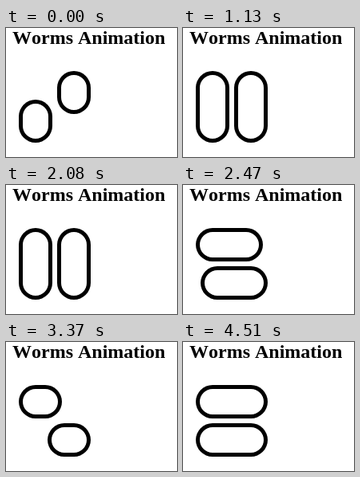
An HTML page for the animation above (4.61 s loop, 214 by 162 pixels).

```html
<!DOCTYPE html>
<html lang="en">
<head>
<meta charset="utf-8">
<title>Worms Animation</title>
<style>
  html, body { margin: 0; width: 100%; height: 100%; overflow: hidden; background: #fff; }
  svg { position: absolute; left: 0; top: 0; }
  text { font: bold 24px "Liberation Serif", "Times New Roman", serif; font-kerning: none; }
  #track { position: absolute; left: 16px; top: 54px; width: 90px; height: 90px; }
  .worm { position: absolute; border-radius: 50px; box-shadow: 0 0 0 5px #000 inset; }
</style>
</head>
<body>
<svg width="214" height="162"><text x="8" y="20">Worms Animation</text></svg>
<div id="track"><div class="worm"></div><div class="worm"></div></div>
<script>
const LOOP = 4610, STEP = 96, LEAD = 34; // ms; the first step is shorter by LEAD
const LAST = 47;                         // final step of the loop
const POSES = 8, GAP = 48;               // poses per lap, inset of a pulled-in edge
const START = 0.18, PER_STEP = 0.4;      // progress along the track, in poses

const EDGES = [0, 1, 2, 3];              // top, right, bottom, left

// CSS "ease": cubic-bezier(.25, .1, .25, 1)
function ease(x) {
  let low = 0, high = 1, s = 0.5;
  for (let i = 0; i < 20; i++) {
    if (0.75 * s - 0.75 * s * s + s ** 3 < x) low = s; else high = s;
    s = (low + high) / 2;
  }
  return 0.3 * s + 2.4 * s * s - 1.7 * s ** 3;
}

// Going clockwise from bottom left, each edge is pulled in for three poses,
// two poses after the edge before it
const pulled = (pose, edge) => (pose + 2 + POSES - 2 * edge) % POSES < 3 ? GAP : 0;

function insetAt(phase) {
  const pose = Math.floor(phase), u = ease(phase - pose);
  return EDGES.map(edge => {
    const from = pulled(pose, edge), to = pulled(pose + 1, edge);
    return (from + (to - from) * u).toFixed(2) + 'px';
  }).join(' ');
}

const worms = document.querySelectorAll('.worm');
const start = performance.now();

function draw() {
  const t = (performance.now() - start) % LOOP;
  const step = Math.min(LAST, Math.floor((t + LEAD) / STEP));
  const phase = START + step * PER_STEP;
  worms.forEach((worm, i) => worm.style.inset = insetAt(phase + i * POSES / 2));
  requestAnimationFrame(draw);
}
draw();
</script>
</body>
</html>
```
